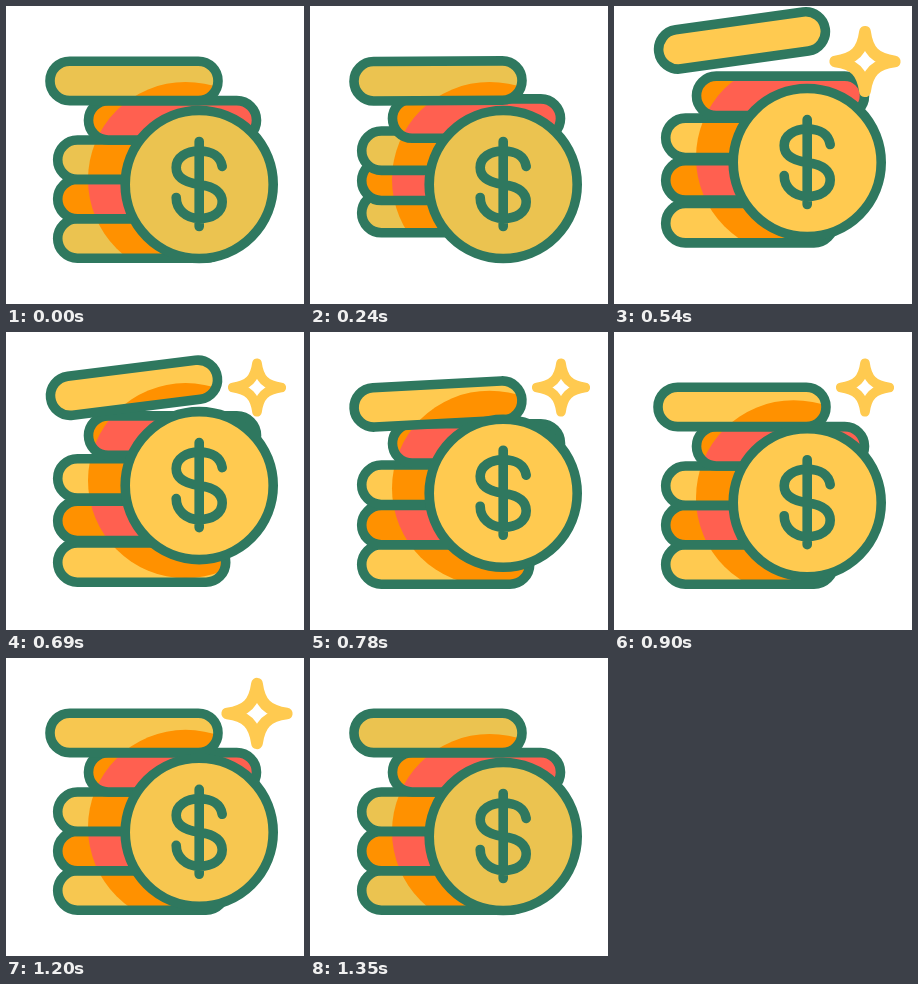
Animation of 298x298 px, one loop 1.8 s. Source, as an HTML page with a canvas:

```html
<!DOCTYPE html>
<html lang="en">
<head>
<meta charset="utf-8">
<title>Coins</title>
<style>
html, body { margin: 0; width: 100%; height: 100%; overflow: hidden; background: #fff; }
canvas { display: block; }
</style>
</head>
<body>
<canvas id="stage" width="298" height="298"></canvas>
<script>
const ctx = document.getElementById('stage').getContext('2d');
const GREEN = '#2f785f', ORANGE = '#ff9100', RED = '#ff6050', GOLD = '#ffca50';
const LOOP = 1800, STEP = 30, END = 1350;
const BAR_W = 168, BAR_H = 39.4, LAG = 35;

const dollar = new Path2D('M0-43V42M23-18C21.5-28 13-33.5 0-33.5S-23-27-23-17' +
  'S-14-2 0 0S23 7 23 17.5S13 34 0 34S-23 25-23 13');
const star = new Path2D('M0-24.3C2.2-8.5 8.5-2.2 24.3 0C8.5 2.2 2.2 8.5 0 24.3' +
  'C-2.2 8.5-8.5 2.2-24.3 0C-8.5-2.2-2.2-8.5 0-24.3Z');

// Progress from 0 to 1 between two times.
const progress = (t, from, to) => Math.min(1, Math.max(0, (t - from) / (to - from)));
const ease = (t, from, to) => {
  const u = progress(t, from, to);
  return u * u * (3 - 2 * u);
};

const barLift = t => 27 * (ease(t, 112, 262) - ease(t, 360, 755));
const topLift = t => 40.5 * Math.sin(Math.PI * progress(t, 250, 830)) ** 2;
const topTilt = t => 8 * (ease(t, 205, 490) - ease(t, 640, 880));
const coinLift = t => 26 * ease(t, 360, 600) - 18.5 * ease(t, 650, 920) - 7.5 * ease(t, 1080, 1340);
const starScale = t => 1.27 * ease(t, 270, 460) - 0.27 * ease(t, 490, 680)
  + 0.24 * ease(t, 1100, 1190) - 1.24 * ease(t, 1190, 1340);
const glow = t => ease(t, 250, 400) - ease(t, 1100, 1340);

function disc(x, y, r, fill) {
  ctx.beginPath();
  ctx.arc(x, y, r, 0, 2 * Math.PI);
  ctx.fillStyle = fill;
  ctx.fill();
}

// A rounded bar, shaded where the coin's shadow falls on it.
function bar(x, y, tilt, fill, shade, coinY) {
  const shape = new Path2D(), pill = new Path2D();
  pill.roundRect(-BAR_W / 2, -BAR_H / 2, BAR_W, BAR_H, BAR_H / 2);
  shape.addPath(pill, new DOMMatrix().translate(x, y).rotate(tilt));
  ctx.save();
  ctx.clip(shape);
  ctx.fillStyle = fill;
  ctx.fill(shape);
  disc(179.5, coinY - 5, 97.5, shade);
  ctx.restore();
  ctx.stroke(shape);
}

function strokeAt(path, x, y, scale, color) {
  ctx.save();
  ctx.translate(x, y);
  ctx.scale(scale, scale);
  ctx.strokeStyle = color;
  ctx.stroke(path);
  ctx.restore();
}

function draw(t) {
  const g = glow(t), coinY = 178.5 - coinLift(t), scale = starScale(t);
  const yellow = `rgb(${235 + 20 * g}, ${195 + 7 * g}, 80)`;
  ctx.clearRect(0, 0, 298, 298);
  ctx.lineWidth = 9.6;
  ctx.lineCap = ctx.lineJoin = 'round';
  ctx.strokeStyle = GREEN;

  for (let i = 0; i < 4; i++) {
    const colors = i % 2 ? [ORANGE, RED] : [yellow, ORANGE];
    const y = 232.5 - i * BAR_H - barLift(t - i * LAG);
    bar(i < 3 ? 135.7 : 166.5, y, 0, ...colors, coinY);
  }
  bar(128, 74.9 - topLift(t), -topTilt(t), yellow, ORANGE, coinY);

  disc(193.2, coinY, 74, yellow);
  ctx.stroke();
  strokeAt(dollar, 193.2, coinY, 1, GREEN);
  if (scale > 0.01) strokeAt(star, 251, 55.5, scale, GOLD);
}

const start = performance.now();
function tick() {
  const t = (performance.now() - start) % LOOP;
  draw(Math.min(Math.floor(t / STEP) * STEP, END));
  requestAnimationFrame(tick);
}
tick();
</script>
</body>
</html>
```
